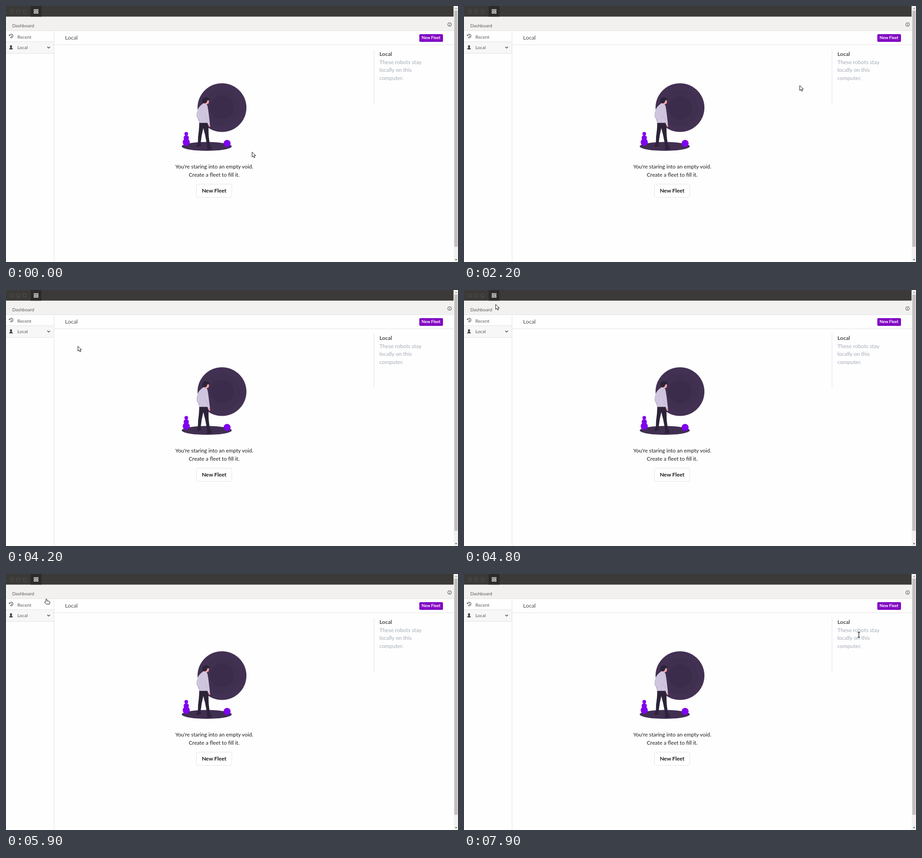
Write an HTML page that moves like this. It is 993 px wide and 564 px high and loops after 8000 ms.

```html
<!DOCTYPE html>
<html lang="en">
<head>
<meta charset="utf-8">
<title>Dashboard</title>
<style>
  html, body { margin: 0; width: 100%; height: 100%; overflow: hidden; background: #fefefe; }
  svg { display: block; width: 993px; height: 564px; }
  text { font-family: Lato, Carlito, sans-serif; font-size: 11.9px; fill: #1b1c1d; }
  .small { font-size: 10.1px; fill: #5b5b5b; }
  .head { font-size: 12.3px; fill: #4a4a4a; }
  .bold { font-weight: 700; }
  .mid { text-anchor: middle; }
  .note { font-size: 11.75px; }
  .soft { fill: #a3aab8; }
  .line { fill: none; stroke: #e3e3e3; }
  .icon { fill: none; stroke: #444; }
  .pointer { fill: #fff; stroke: #111; stroke-linejoin: round; }
</style>
</head>
<body>
<svg viewBox="0 0 993 564">
  <rect width="993" height="564" fill="#fefefe"/>

  <!-- title bar and breadcrumb -->
  <rect y="23" width="984" height="31" fill="#f2f1f0"/>
  <rect width="983.5" height="23.4" fill="#3c3a38"/>
  <rect x="54" width="24" height="23.4" fill="#2c2b2a"/>
  <g fill="none" stroke="#595754">
    <circle cx="12.7" cy="12.2" r="3.8"/>
    <circle cx="26.9" cy="12.2" r="3.8"/>
    <circle cx="41" cy="12.2" r="3.8"/>
  </g>
  <path d="M61.8 7.5h3.3v3.3h-3.3zM67.1 7.5h3.3v3.3h-3.3zM61.8 12.8h3.3v3.3h-3.3zM67.1 12.8h3.3v3.3h-3.3z" fill="none" stroke="#f2f2f2" stroke-width="1.2"/>
  <path class="line" d="M0 54.5H984"/>
  <text class="small" x="13.8" y="47">Dashboard</text>
  <circle class="icon" cx="974.5" cy="40.8" r="4"/>
  <path class="icon" d="M974.5 40.3v3M974.5 38.3v1.1"/>

  <!-- sidebar -->
  <rect y="79" width="105" height="25" fill="#f7f7f7"/>
  <path class="line" d="M0 78.5H105M0 104.5H105M105.5 55V564"/>
  <path class="icon" d="M7.9 64.2A4 4 0 1 1 8.9 69.3M11.5 64.2V66.9L13.3 68" stroke-width="1.1"/>
  <path d="M6.5 62.9V66H9.700z" fill="#444"/>
  <text class="small" x="25" y="71.5">Recent</text>
  <path d="M11 86.6c1.7 0 2.4 1.2 2.3 2.7-.1 1.2-.6 2-1.1 2.5v.8c1.4.4 2.8.9 2.8 2.9H7c0-2 1.4-2.5 2.8-2.9v-.8c-.5-.5-1-1.3-1.1-2.5-.1-1.5.6-2.7 2.3-2.7z" fill="#3c3c3c"/>
  <text class="small" x="25" y="95">Local</text>
  <path class="icon" d="M90.7 89.8L93.7 92.8 96.7 89.8" stroke-width="1.3"/>

  <!-- main header -->
  <path class="line" d="M106 85.5H984"/>
  <text class="head" x="129.8" y="74">Local</text>
  <rect x="908" y="62" width="52" height="17" rx="2.5" fill="#8205c4"/>
  <text class="bold mid" x="933.8" y="73.4" style="font-size:9.1px;fill:#fff">New Fleet</text>

  <!-- description -->
  <path class="line" d="M808.5 96V216"/>
  <text class="bold" x="820.5" y="110" style="fill:#484a50">Local</text>
  <text class="soft" x="820.5" y="127.5">These robots stay</text>
  <text class="soft" x="820.5" y="145">locally on this</text>
  <text class="soft" x="820.5" y="162.5">computer.</text>

  <!-- illustration -->
  <circle cx="474.500" cy="223.900" r="53.700" fill="#433153"/>
  <circle cx="474.500" cy="223.900" r="41" fill="#403050"/>
  <circle cx="474.500" cy="223.900" r="26" fill="#3b2c4b"/>
  <ellipse cx="441" cy="309.300" rx="54.800" ry="9.700" fill="#412f52"/>
  <g fill="#7f00ef">
    <circle cx="396" cy="281.600" r="4"/>
    <circle cx="396" cy="290.400" r="5.700"/>
    <circle cx="396" cy="300" r="7.800"/>
    <circle cx="485.700" cy="302.700" r="7.700"/>
  </g>
  <path d="M424.500 256H444C445.500 266 444.500 278 445.500 288L447.500 304 452.500 313.500 450.500 315.500 443.500 317.500 441.500 315.500 442 308 437.500 285 433.500 269 430 285 427.500 303 428.500 308.500 420 311 418.500 308.500 421.500 302 422 288C423.500 277 424.500 268 424.500 256Z" fill="#2c2339"/>
  <path d="M437 208.500L445.500 206.500 446 211 444.500 215.500 441.500 216 441 220.500 434 216Z" fill="#f3a5ac"/>
  <path d="M432 212.500C430 206 433 201 438 201 443 201 447.500 203.500 447 207.500L442.500 208 441 212 438 214.500 434 214.500Z" fill="#2c2438"/>
  <path d="M443.500 256L447.500 260 448.800 265.500 446.500 266.500 443.500 261Z" fill="#f3a5ac"/>
  <path d="M434.500 214C438 215.500 441.500 217 442.700 220 445 232 446.500 247 448 260L444.500 261.500 442.500 257.500 424 257.500 424 250C419.500 245 418.500 239 420 233 421 225 427 218.500 434.500 214Z" fill="#d0c5de"/>
  <path d="M420.300 231C418.500 240 420 246 424.500 250L424 256 422.500 250C418 244 418 238 420.300 231Z" fill="#aaa0bb"/>
  <path d="M436 241L444 251" fill="none" stroke="#b8adc8" stroke-width=".8"/>

  <text class="note mid" x="457.500" y="358">You're staring into an empty void.</text>
  <text class="note mid" x="457.300" y="375.500">Create a fleet to fill it.</text>
  <rect x="418.500" y="392.500" width="77.500" height="29" rx="3" fill="#fff" stroke="#e3e3e3"/>
  <text class="bold mid" x="457.200" y="411">New Fleet</text>

  <!-- scrollbar -->
  <rect x="983.5" width="9.500" height="564" fill="#f1f1f0"/>
  <rect x="985" y="10" width="7.200" height="520.500" fill="#c1c0bf"/>
  <path d="M986.300 6.600h5l-2.500-2.700z" fill="#8a8a8a"/>
  <path d="M986.300 557.800h5l-2.500 2.700z" fill="#505050"/>

  <g id="cursor">
    <path id="arrow" class="pointer" d="M.6.800V11.700L3.200 9.300 5 13.300 6.900 12.500 5.200 8.600H8.600Z"/>
    <path id="hand" class="pointer" d="M-1.500 7V1.600C-1.500.200 1 .200 1 1.600V4.800L5.800 5.500C7 5.800 7.500 6.400 7.400 7.500L6.600 11.800H-1L-4.400 8.200C-4.900 7.200-3.800 6.300-2.700 6.900Z"/>
    <path id="beam" d="M-2.500-5.500H-.6L0-5 .600-5.500H2.500M0-5V5M-2.500 5.500H-.6L0 5 .600 5.500H2.500" fill="none" stroke="#222" stroke-width="1.300"/>
  </g>
</svg>
<script>
  const LOOP = 8000, STEP = 100;
  const home = [540, 321];
  // start time, number of steps, end point, optional bend point
  const moves = [
    [800, 2, [712, 263]],
    [1100, 2, [775, 183]],
    [2200, 1, [737, 174.5]],
    [2300, 3, [662, 145]],
    [2700, 1, [660, 144.5]],
    [3300, 1, [633.7, 145]],
    [3500, 1, [373, 143]],
    [3700, 2, [277, 139]],
    [4000, 9, [69, 31], [60, 130]],
    [4900, 6, [19, 42]],
    [5700, 9, [366, 117], [90, 51.4]],
    [6600, 2, [411, 120]],
    [7000, 9, [864, 145], [700, 205]],
    [7900, 1, [867.5, 134]]
  ];
  const shapes = ["arrow", "hand", "beam"].map(id => document.getElementById(id));
  const cursor = document.getElementById("cursor");

  const within = (x, y, l, t, r, b) => x >= l && x <= r && y >= t && y <= b;

  function shapeAt(x, y) {
    if (within(x, y, 820, 98, 915, 166)) return "beam";
    if (within(x, y, 0, 54, 105, 104) || within(x, y, 12, 36, 64, 50)) return "hand";
    return "arrow";
  }

  function positionAt(time) {
    let from = home;
    for (const [start, steps, to, bend] of moves) {
      if (time < start) break;
      const k = Math.min(1, (Math.floor((time - start) / STEP) + 1) / steps);
      if (k === 1) { from = to; continue; }
      return from.map((a, i) => {
        const mid = bend ? bend[i] : (a + to[i]) / 2;
        return (1 - k) ** 2 * a + 2 * k * (1 - k) * mid + k * k * to[i];
      });
    }
    return from;
  }

  function draw() {
    const [x, y] = positionAt(performance.now() % LOOP);
    const kind = shapeAt(x, y);
    cursor.setAttribute("transform", `translate(${x} ${y})`);
    for (const s of shapes) s.style.display = s.id === kind ? "" : "none";
    requestAnimationFrame(draw);
  }
  draw();
</script>
</body>
</html>
```
